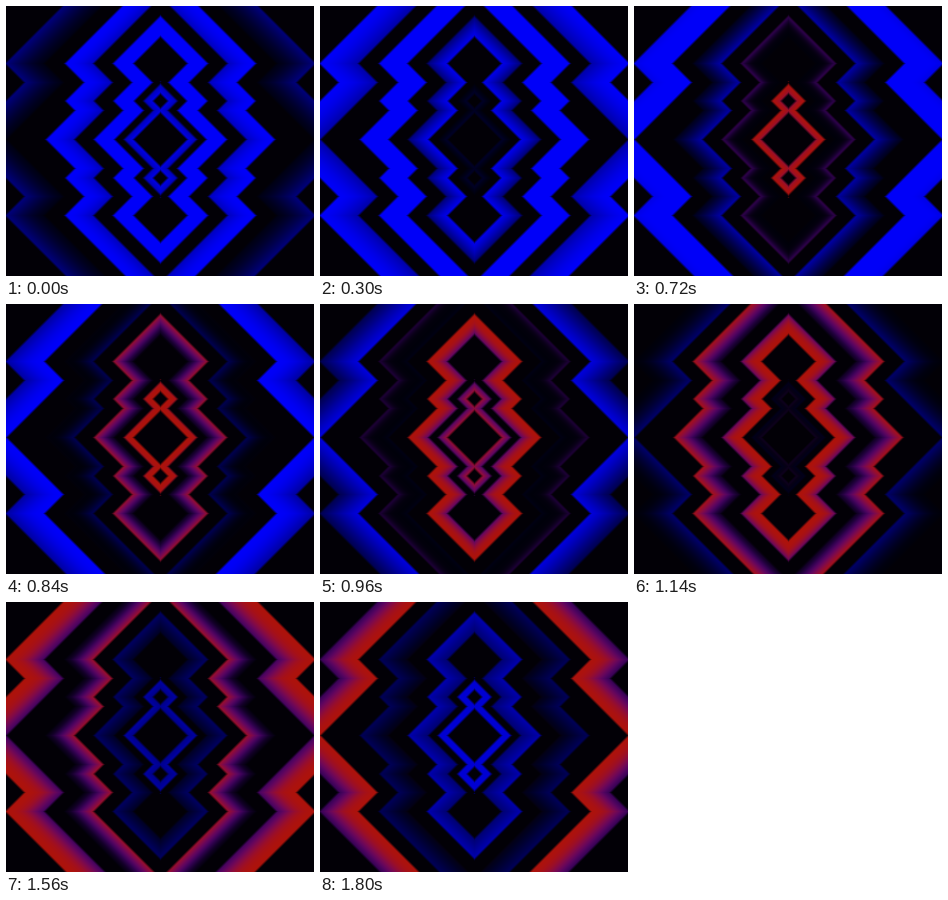
These frames come from a looping animation (308 by 270 pixels, 1.86 s). An HTML page with a canvas:

```html
<!DOCTYPE html>
<html>
<head>
<meta charset="utf-8">
<title>Zigzag rings</title>
<style>
html, body { margin: 0; width: 100%; height: 100%; overflow: hidden; background: #000; }
canvas { display: block; width: 100vw; height: 100vh; }
</style>
</head>
<body>
<canvas id="stage" width="308" height="270"></canvas>
<script>
const W = 308, H = 270, CX = 154.5, CY = 133.5;
const LOOP = 1860, STEP = 60, SOFT = 4.5;
const ctx = document.getElementById('stage').getContext('2d');
const image = ctx.createImageData(W, H);

const clamp = (v, lo, hi) => Math.min(hi, Math.max(lo, v));
const smooth = (from, to, v) => {
  const k = clamp((v - from) / (to - from), 0, 1);
  return k * k * (3 - 2 * k);
};

// Half widths at the middle row. The red wave reaches the outer edge at
// `start` and crosses the ring inwards in `lag` ms.
const rings = [[27, 36.5], [46, 66.5], [86, 114.5], [154, 193]].map(([inner, outer], n) => ({
  inner, outer,
  start: 750 + 170 * n + 33 * n * n,
  lag: Math.min(230, 10 * (outer - inner)),
  notched: n < 3
}));

// The outline runs diagonally and turns back at the notches.
function zigzag(dy, notched) {
  const small = notched ? clamp(dy - 29, 0, 9.5) : 0;
  return dy - 2 * small - 2 * clamp(dy - 57, 0, 19);
}

// Colour at p ms after the red peak: long blue, purple, red, purple, blue again
function colour(p) {
  const red = Math.exp(-Math.pow(Math.abs(p) / 225, 3));
  const purple = Math.exp(-Math.pow((Math.abs(p) - 200) / 90, 2));
  const before = smooth(-1850, -1250, p) * smooth(-420, -930, p);
  const after = clamp((p - 330) / 620, 0, 1);
  return [172 * red, 18 * red * red, 10 + 85 * purple + 238 * before + 200 * after];
}

const cells = [];
for (let y = 0; y < H; y++) {
  for (let x = 0; x < W; x++) {
    const dx = Math.abs(x + 0.5 - CX), dy = Math.abs(y + 0.5 - CY);
    rings.forEach((r, n) => {
      if (n === 0 && dy > 58) return;
      const u = dx + zigzag(dy, r.notched);
      const depth = Math.min(u - r.inner, r.outer - u);
      const cover = smooth(-SOFT / 2, SOFT / 2, depth);
      if (!cover) return;
      const k = clamp((r.outer - u) / (r.outer - r.inner), 0, 1);
      cells.push({ at: (y * W + x) * 4, cover, delay: Math.round(r.start + r.lag * k) });
    });
  }
}

const base = [2, 0, 6];
for (let i = 0; i < image.data.length; i += 4) image.data.set([...base, 255], i);

function draw(t) {
  const shades = new Map();
  for (const { at, cover, delay } of cells) {
    if (!shades.has(delay)) shades.set(delay, colour(t - delay));
    const rgb = shades.get(delay);
    for (let c = 0; c < 3; c++) image.data[at + c] = base[c] + (rgb[c] - base[c]) * cover;
  }
  ctx.putImageData(image, 0, 0);
}

const begin = performance.now();
let shown = -1;
function tick() {
  const t = Math.floor(Math.max(0, performance.now() - begin) % LOOP / STEP) * STEP;
  if (t !== shown) draw(shown = t);
  requestAnimationFrame(tick);
}
tick();
</script>
</body>
</html>
```
